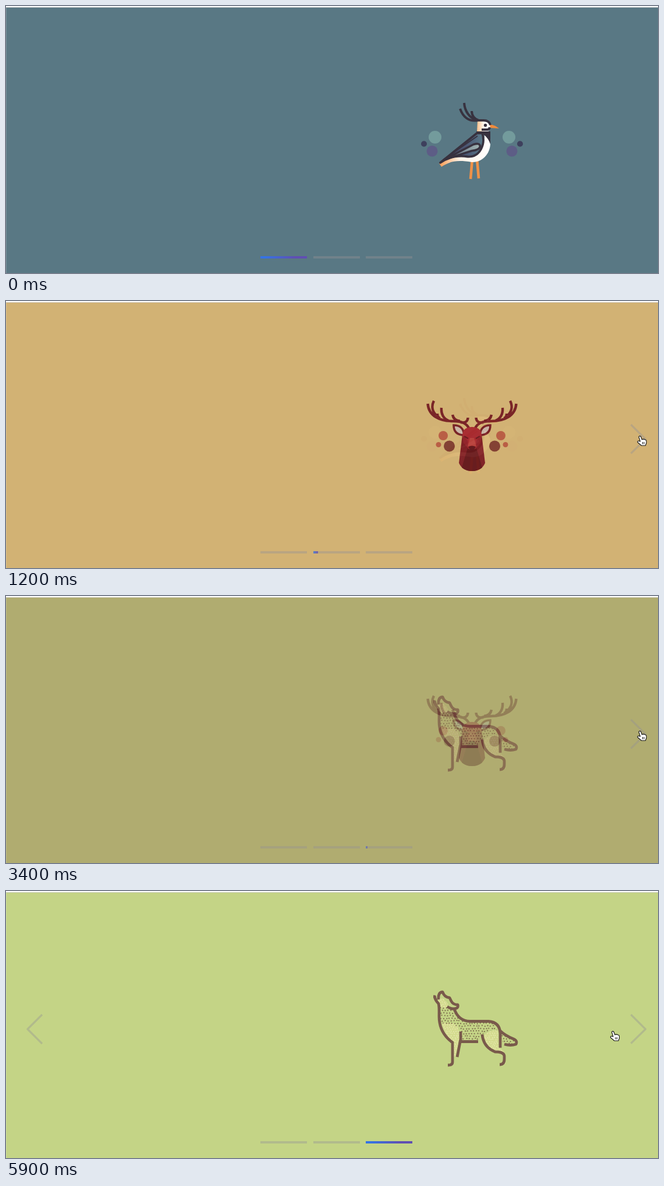
An HTML page that plays this animation: 1120x460 px, repeating every 6 s.

```html
<!DOCTYPE html>
<html lang="en">
<head>
<meta charset="utf-8">
<title>Animal slider</title>
<style>
  html, body { margin: 0; width: 100%; height: 100%; overflow: hidden; background: #fff; }
  svg { display: block; width: 1120px; height: 460px; }
  .line { fill: none; stroke-linejoin: round; }
  .back { x: 0; y: 2.7px; width: 1120px; height: 458px; }
</style>
</head>
<body>
<svg viewBox="0 0 1120 460">
  <defs>
    <linearGradient id="fill"><stop offset=".1" stop-color="#3573e4"/><stop offset=".75" stop-color="#604eb2"/></linearGradient>
    <linearGradient id="cheek"><stop offset="0" stop-color="#f9bd88"/><stop offset=".45" stop-color="#fff2e6"/><stop offset=".6" stop-color="#fff"/></linearGradient>
    <linearGradient id="belly"><stop offset="0" stop-color="#f79a50"/><stop offset=".4" stop-color="#fff2e6"/><stop offset="1" stop-color="#fff"/></linearGradient>
    <linearGradient id="wing"><stop offset="0" stop-color="#454361"/><stop offset=".6" stop-color="#4b5673"/><stop offset="1" stop-color="#5a7a8a"/></linearGradient>
    <linearGradient id="feather"><stop offset="0" stop-color="#4d5870"/><stop offset="1" stop-color="#a3b6b5"/></linearGradient>
    <clipPath id="coat"><path d="M745 198L758 200L771 205Q776 224 796 226H830Q847 227 848 244L872 257Q877 260 874 263Q864 264 854 261L846 240Q830 238 818 247L812 258H782V241L770 230L748 228Q744 212 745 198Z"/></clipPath>
    <clipPath id="pale"><path d="M741 185H751L759 194L757 203L746 201ZM749 228Q764 224 776 232L779 245V258L772 285H769V260Q754 250 749 228ZM820 249Q830 239 845 240L846 270L855 276L858 285V298H854V280L838 274Q823 265 820 249Z"/></clipPath>
  </defs>

  <rect class="back" fill="#3c3732"/>

  <g class="slide">
    <rect class="back" fill="#597884"/>
    <g id="birdDots"></g>
    <path d="M801 263L798 298M809 263L812 297" class="line" stroke="#ef9148" stroke-width="4.6"/>
    <path d="M744 271C758 262 775 257 794 259C813 258 822 243 822 221L832 234C833 254 818 270 800 269C775 265 763 267 748 277Z" fill="url(#belly)"/>
    <path d="M746 270L809 219H818C824 237 815 261 793 259.500C775 257 760 260 746 270Z" fill="url(#wing)" stroke="#38323f" stroke-width="3.8" stroke-linejoin="round"/>
    <path d="M752 265L803 238.500Q814 235 814.500 242Q813 248 800 249.500Z" fill="url(#feather)" stroke="#38323f" stroke-width="3.6" stroke-linejoin="round"/>
    <path d="M754 264L799 250M752 264L810 224" class="line" stroke="#38323f" stroke-width="2"/>
    <path d="M819 217H832V238Q829 228 820 221Z" fill="#38323f"/>
    <path d="M810 198H823Q832 199 832 207Q832 217 824 217H809Z" fill="url(#cheek)"/>
    <path d="M831 204Q840 205 847 211L832 210Z" fill="#ef8b3c"/>
    <path d="M780 177C785 191 795 200 811 197M787 167C788 181 796 193 808 196M800 181C800 189 805 195 812 197M807 197H820Q830 197 832 205M817 213H827Q830 213 831 209M808 218H832" class="line" stroke="#38323f" stroke-width="4"/>
    <circle cx="823.5" cy="205.500" r="2.7" fill="#38323f"/>
  </g>

  <g class="slide">
    <rect class="back" fill="#fed383"/>
    <g id="deerDots"></g>
    <path d="M784 230L778 279Q784 293 800.500 293Q817 293 823 279L817 230Z" fill="#951b20"/>
    <path d="M794 250H807L818 287Q810 293 800.500 293Q791 293 783 287Z" fill="#741114"/>
    <g id="antler">
      <path d="M724.500 177C726 198 745 207 768 207C784 207 792 211 796 221M735 172C730 182 733 191 739 197M748 184C747 195 752 203 760 206M741 194Q741 201 746 202M767 196Q769 206 780 207M793.500 201Q793 211 781 209" class="line" stroke="#8b1c1f" stroke-width="4.4"/>
      <path d="M769 214C781 214 786 220 787 231C775 231 769 225 769 214Z" fill="#f4d8c5" stroke="#8b1c1f" stroke-width="3.6"/>
    </g>
    <use href="#antler" transform="matrix(-1 0 0 1 1601 0)"/>
    <path d="M784 231Q785 217 800.500 217Q816 217 817 231L815 244L807 254Q800.500 259 794 254L786 244Z" fill="#c9272d"/>
    <path d="M784 231L793 240L794 254L786 244ZM817 231L808 240L807 254L815 244Z" fill="#ad2027"/>
    <path d="M797 236H804L808 251H793Z" fill="#dc453e"/>
    <path d="M794 251Q800.500 248 807 251Q804 258 800.500 258Q797 258 794 251Z" fill="#6f1014"/>
    <path d="M787 233L794 237M814 233L807 237" class="line" stroke="#7d1519" stroke-width="2.4"/>
  </g>

  <g class="slide">
    <rect class="back" fill="#c4d486"/>
    <g clip-path="url(#pale)"><rect x="735" y="180" width="130" height="122" fill="#d4db8f"/><g id="paleDots"></g></g>
    <g clip-path="url(#coat)" id="coatDots"></g>
    <path d="M734 182H736.500Q737 188 743 194C744.500 200 744 206 744 216C744 239 756 253 767 261V295Q767 300 759 300M743 187Q742 174 750 174Q753 183 762 184L765 190Q768 196 776 196Q778 203 768 203Q763 203 758 199M770 203Q777 224 797 224.500H829Q848 226 849 245V270M849 241Q857 249 872 255Q879 258 876 264Q867 267 856 264M781 242V259.500H811M781 255L775 286M818 247Q820 269 840 277Q855 277 856 284V290Q856 299 848 299" class="line" stroke="#795a4b" stroke-width="4.8"/>
  </g>

  <path d="M.5 2.500V460" stroke="#fff" stroke-opacity=".2"/>
  <g class="line" stroke="#949194" stroke-width="3.2">
    <path id="prev" d="M62 213L37 238L62 263"/>
    <path id="next" d="M1073.500 213L1098.500 238L1073.500 262.500"/>
  </g>
  <g id="bars"></g>
  <path id="hand" d="M-1.500 1.500Q0-1 2 1L4 6.500Q5.500 4.500 7 6Q8.500 5 9.500 6.800Q11.500 6.500 11.500 9V12L10 16.500H3L-3.500 11Q-4 8.500-1.500 8.500L1 9.500ZM5 10.500V14M7.500 10.500V14" fill="#fff" stroke="#111" stroke-width="1.1" stroke-linejoin="round"/>
</svg>
<script>
const LOOP = 6000, STEP = 100;
const $ = id => document.getElementById(id);

function add(parent, tag, attrs) {
  const el = document.createElementNS('http://www.w3.org/2000/svg', tag);
  for (const key in attrs) el.setAttribute(key, attrs[key]);
  return parent.appendChild(el);
}

// Circles that appear on both sides of the animal.
function mirrorDots(id, dots) {
  for (const [cx, cy, r, fill] of dots)
    for (const x of [cx, 1601 - cx]) add($(id), 'circle', { cx: x, cy, r, fill });
}
mirrorDots('birdDots', [[737, 226, 11, '#739b9c'], [732, 250, 9.5, '#5d5d86'], [718, 237.5, 5, '#3e405d']]);
mirrorDots('deerDots', [[751, 232, 8, '#dd6646'], [743, 247.5, 4.5, '#dd6646'], [761.5, 250, 9.5, '#98422f']]);

// Jittered stipple over the wolf; clip paths trim it to the fur.
let seed = 7;
const rand = () => (seed = seed * 16807 % 2147483647) / 2147483647 - 0.5;
function stipple(id, gap, r, fill) {
  for (let y = 184, row = 0; y < 300; y += gap * 0.9, row++)
    for (let x = 737 + row % 2 * gap / 2; x < 880; x += gap)
      add($(id), 'circle', { cx: (x + rand() * 1.8).toFixed(1), cy: (y + rand() * 1.8).toFixed(1), r, fill });
}
stipple('coatDots', 4.9, 1.15, '#7f704f');
stipple('paleDots', 4, 1, '#e6e8ae');

const fills = [437, 528, 618].map(x => {
  add($('bars'), 'rect', { x, y: 431, width: 80, height: 4, fill: '#949194', opacity: 0.4 });
  return add($('bars'), 'rect', { x, y: 431, width: 0, height: 4, fill: 'url(#fill)' });
});
const slides = document.querySelectorAll('.slide');

const clamp = v => Math.min(1, Math.max(0, v));
const ramp = (t, from, to) => clamp((t - from) / (to - from));
const smooth = p => p * p * (3 - 2 * p);

// Linear interpolation through [time, ...values] keys.
function track(keys, t) {
  let i = 1;
  while (i < keys.length - 1 && t > keys[i][0]) i++;
  const a = keys[i - 1], b = keys[i], p = ramp(t, a[0], b[0]);
  return a.slice(1).map((v, n) => v + (b[n + 1] - v) * p);
}

const handPath = [
  [300, 1103, 200], [700, 1084, 230], [1000, 1080.5, 232.5], [1200, 1088.5, 232.5], [3900, 1088.5, 232.5],
  [4200, 1064, 233], [4700, 943.5, 236.5], [5000, 935, 237], [5500, 1040, 241], [5900, 1042, 241.5]
];
const barTwo = [[975, 0], [1200, 8], [2500, 74], [2620, 80]];
const barThree = [[3330, 0], [3400, 3], [4700, 70], [4900, 80]];

function draw(t) {
  const toDeer = smooth(ramp(t, 872, 1348));
  const toWolf = smooth(ramp(t, 3162, 3638));
  [1 - toDeer, toDeer * (1 - toWolf) + 0, toWolf].forEach((o, i) => slides[i].setAttribute('opacity', o));

  const widths = [t < 900 ? 80 : 0, t < 3200 ? track(barTwo, t)[0] : 0, track(barThree, t)[0]];
  widths.forEach((w, i) => fills[i].setAttribute('width', w));
  fills[1].setAttribute('opacity', 0.5 + 0.5 * ramp(t, 1000, 1400));
  fills[2].setAttribute('opacity', 0.5 + 0.5 * ramp(t, 3350, 3700));

  $('next').setAttribute('opacity', 0.4 * ramp(t, 200, 600));
  $('prev').setAttribute('opacity', 0.4 * ramp(t, 4200, 4600));

  const [x, y] = track(handPath, t);
  $('hand').setAttribute('transform', `translate(${x} ${y})`);
  $('hand').setAttribute('visibility', t < 300 ? 'hidden' : 'visible');
}

function tick() {
  draw(Math.floor(performance.now() % LOOP / STEP) * STEP);
  requestAnimationFrame(tick);
}
tick();
</script>
</body>
</html>
```
